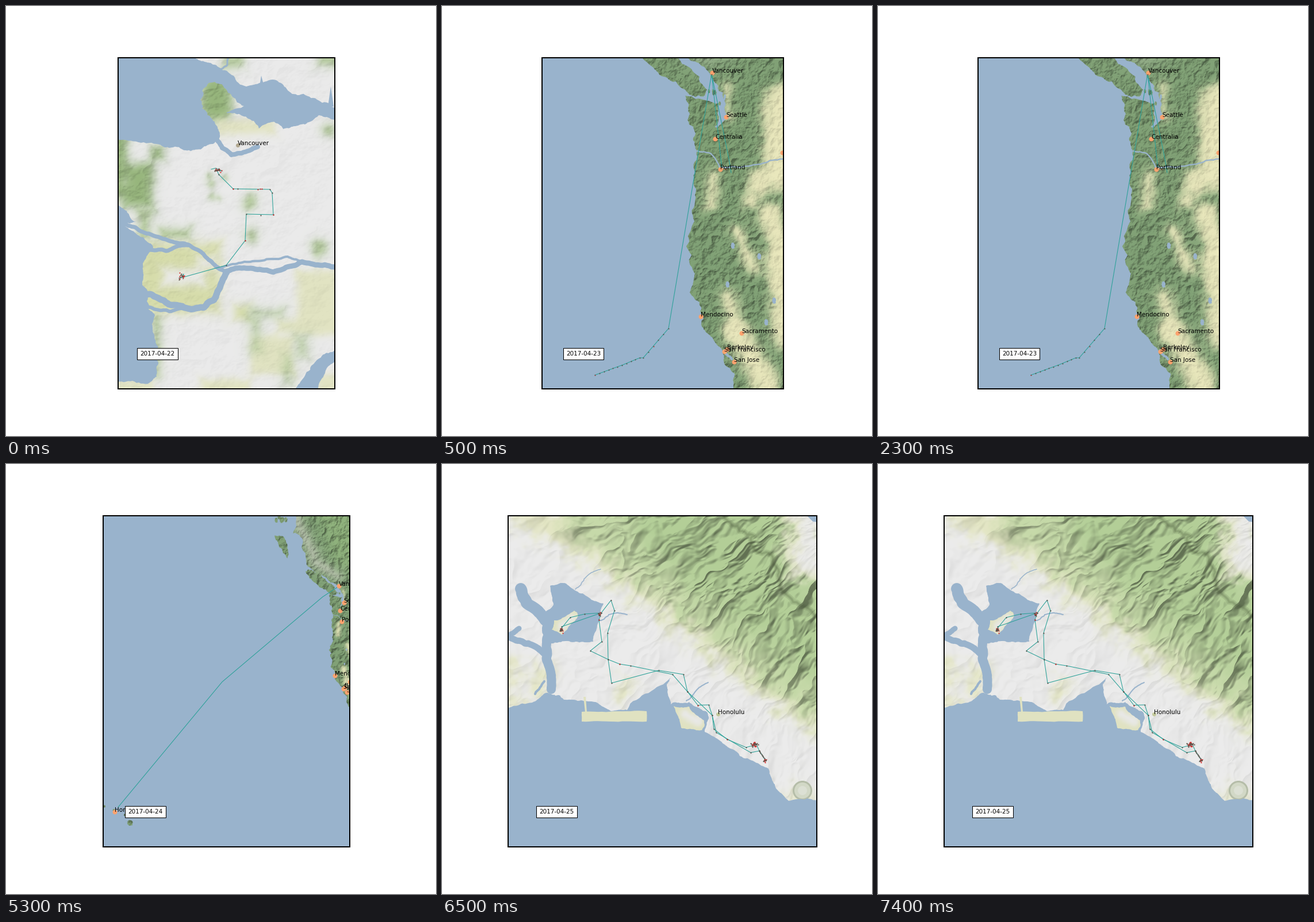
A matplotlib script that plays this animation: 748 by 748 pixels, repeating every 8000 ms.

```python
import numpy as np
import matplotlib.pyplot as plt
from matplotlib.animation import FuncAnimation
from matplotlib.patches import Polygon, Circle

SIZE = 748
DPI = 74.8
PT = 72 / DPI  # points per pixel
MID = 383.9

WATER = "#99b3cc"
TRACK = "#2aa198"
DARK = "#5a5148"
RED = "#d42a2a"
CITY = "#fca26e"

GREY = (233, 233, 233)
YELLOW = (212, 218, 168)
PALE = (224, 226, 193)
GREEN = (172, 194, 148)
LEAF = (146, 176, 120)
FOREST = (119, 149, 109)
DRY = (228, 226, 184)
SNOW = (196, 198, 186)

# longitude and latitude
CITIES = {
    "Vancouver": (-123.12, 49.25), "Seattle": (-122.33, 47.58),
    "Centralia": (-122.95, 46.72), "Portland": (-122.67, 45.52),
    "Mendocino": (-123.78, 39.36), "Sacramento": (-121.45, 38.61),
    "Berkeley": (-122.27, 37.90), "San Francisco": (-122.43, 37.80),
    "San Jose": (-121.88, 37.34), "Honolulu": (-157.86, 21.27)}
SHORE = [(-130.1, 57), (-130.2, 54.3), (-128.3, 52.5), (-127.6, 51.1),
         (-125.1, 50.1), (-123.5, 49.4), (-123.05, 49), (-122.5, 48.5),
         (-122.3, 47.5), (-122.9, 47.1), (-122.7, 48.1), (-124.65, 48.38),
         (-124.2, 47.2), (-124, 46.25), (-124.1, 44.5), (-124.5, 42.8),
         (-124.1, 41.2), (-124.4, 40.4), (-123.8, 39.6), (-123.75, 39),
         (-122.95, 38.2), (-122.5, 37.7), (-122.4, 37.2), (-121.85, 36.8),
         (-121.9, 36.4), (-120.6, 34.5)]
BIG_ISLE = [(-128.3, 50.7), (-127.3, 50.9), (-125, 49.75), (-123.4, 48.6),
            (-123.6, 48.35), (-124.8, 48.65), (-126.6, 49.5), (-128.3, 50.7)]
NORTH_ISLE = [(-133.1, 54.1), (-131.7, 54), (-131.1, 52), (-132.4, 53.1),
              (-133.1, 54.1)]

plt.rcParams["font.family"] = "DejaVu Sans"
fig = plt.figure(figsize=(SIZE / DPI, SIZE / DPI), dpi=DPI, facecolor="white")


def noise(u, v, seed, octaves=4):
    """Sum of smooth value noise, roughly 0..1."""
    rng = np.random.default_rng(seed)
    total, weight = 0, 0
    for k in range(octaves):
        lattice = rng.random((64, 64))
        a, b = u * 2**k, v * 2**k
        i, j = np.floor(a).astype(int), np.floor(b).astype(int)
        s, t = a - i, b - j
        s, t = s * s * (3 - 2 * s), t * t * (3 - 2 * t)

        def at(p, q):
            return lattice[(i + p) % 64, (j + q) % 64]

        top = at(0, 0) * (1 - s) + at(1, 0) * s
        low = at(0, 1) * (1 - s) + at(1, 1) * s
        total = total + (top * (1 - t) + low * t) / 2**k
        weight += 1 / 2**k
    return total / weight


def ridged(u, v, seed, octaves=4):
    return -abs(2 * noise(u, v, seed, octaves) - 1)


def rough(pts, amp=0.08, depth=4):
    """Roughen a line by displacing midpoints sideways."""
    rng = np.random.default_rng(len(pts))
    pts = np.array(pts, float)
    for _ in range(depth):
        a, b = pts[:-1], pts[1:]
        side = np.stack([a[:, 1] - b[:, 1], b[:, 0] - a[:, 0]], 1)
        size = np.hypot(*side.T)[:, None]
        side *= np.minimum(1, 25 / np.maximum(size, 1e-6))
        out = np.empty((2 * len(pts) - 1, 2))
        out[::2] = pts
        out[1::2] = (a + b) / 2 + side * rng.normal(0, amp, (len(a), 1))
        pts = out
    return pts


def oval(x, y, w, h):
    a = np.linspace(0, 2 * np.pi, 13)
    return rough(np.stack([x + w * np.cos(a), y + h * np.sin(a)], 1), 0.12, 2)


def along(pts, n):
    """n points spread evenly along a path."""
    x, y = np.array(pts, float).T
    d = np.r_[0, np.cumsum(np.hypot(np.diff(x), np.diff(y)))]
    s = np.linspace(0, d[-1], n)
    return np.stack([np.interp(s, d, x), np.interp(s, d, y)], 1)


class Terrain:
    def __init__(self, ax, base, ragged, seed):
        (x0, x1), (y1, y0) = ax.get_xlim(), ax.get_ylim()
        xs = np.linspace(x0, x1, round(x1 - x0))
        ys = np.linspace(y0, y1, round(y1 - y0))
        self.x, self.y = np.meshgrid(xs, ys)
        self.img = np.ones(self.x.shape + (3,)) * base
        self.edge = ragged * (noise(self.x / 18, self.y / 18, seed, 3) - 0.5)

    def paint(self, color, soft, *shapes, alpha=1.0):
        """Soft boxes (x0, y0, x1, y1) or capsules (x0, y0, x1, y1, r)."""
        x, y = self.x, self.y
        for x0, y0, x1, y1, *r in shapes:
            if r:
                dx, dy = x1 - x0, y1 - y0
                t = ((x - x0) * dx + (y - y0) * dy) / max(dx * dx + dy * dy, 1)
                t = np.clip(t, 0, 1)
                d = np.hypot(x - x0 - t * dx, y - y0 - t * dy) - r[0]
            else:
                d = np.maximum(abs(x - (x0 + x1) / 2) - (x1 - x0) / 2,
                               abs(y - (y0 + y1) / 2) - (y1 - y0) / 2)
            d = np.clip((d + self.edge) / soft, -30, 30)
            a = alpha / (1 + np.exp(d))[..., None]
            self.img = self.img * (1 - a) + np.array(color) * a

    def shade(self, height, gain, floor):
        """Darken the slopes that face south-east, most of all on the green."""
        gy, gx = np.gradient(height)
        s = gx + gy
        s = np.clip(s / s.std(), -2.4, 0.6)
        wood = np.clip((self.img[..., 1] - self.img[..., 0]) / 26, 0, 1)
        light = 1 + gain * s * (floor + (1 - floor) * wood)
        return np.clip(self.img * light[..., None], 0, 245) / 255


def scene(half, date):
    ax = fig.add_axes([(MID - half) / SIZE, 0.11, 2 * half / SIZE, 0.77],
                      facecolor=WATER)
    ax.set(xlim=(MID - half, MID + half), ylim=(0.89 * SIZE, 0.12 * SIZE),
           xticks=[], yticks=[])
    ax.set_autoscale_on(False)
    for spine in ax.spines.values():
        spine.set(linewidth=2 * PT, zorder=6)
    ax.text(0.1, 0.1, date, fontsize=10, transform=ax.transAxes, zorder=7,
            bbox=dict(facecolor="white", pad=5))
    return ax


def land(ax, img, pts=None):
    im = ax.imshow(img, extent=(*ax.get_xlim(), *ax.get_ylim()),
                   aspect="auto", interpolation="bilinear", zorder=1)
    if pts is not None:
        im.set_clip_path(Polygon(pts, transform=ax.transData))


def water(ax, pts):
    ax.add_patch(Polygon(pts, facecolor=WATER, edgecolor="none", zorder=1))


def river(ax, width, *pts):
    ax.plot(*rough(pts, 0.05).T, color=WATER, lw=width * PT, zorder=1,
            solid_capstyle="round", solid_joinstyle="round")


def track(ax, *pts):
    ax.plot(*np.array(pts).T, color=TRACK, lw=1.05 * PT, zorder=2)


def dots(ax, color, pts, size=2.2):
    ax.plot(*np.array(pts).T, "o", color=color, ms=size * PT, mew=0, zorder=3)


def swarm(ax, x, y, spread, n):
    pts = np.random.default_rng(n).normal((x, y), spread, (n, 2))
    dots(ax, RED, pts[::2])
    dots(ax, DARK, pts[1::2])


def city(ax, x, y, name="", color=CITY, size=8):
    ax.plot([x], [y], "o", color=color, ms=size * PT, mew=0, zorder=3)
    ax.text(x, y, name, fontsize=10, zorder=4, clip_on=True)


def city_day():
    ax = scene(188.45, "2017-04-22")
    t = Terrain(ax, GREY, 9, seed=4)
    t.paint(LEAF, 5, (185, 225, 212, 330), (205, 275, 255, 350),
            (255, 245, 272, 264), (365, 150, 365, 175, 28))
    t.paint(GREEN, 5, (232, 355, 250, 405), (268, 387, 320, 405),
            (545, 418, 545, 422, 11), (425, 338, 425, 344, 9),
            (427, 398, 427, 400, 8), (262, 545, 262, 640, 6),
            (382, 85, 412, 104), (545, 84, 580, 102), (562, 214, 562, 216, 8))
    for x, y in np.random.default_rng(2).uniform((345, 292), (390, 350), (5, 2)):
        t.paint(GREEN, 3, (x, y, x, y, 4), alpha=0.7)
    t.paint(YELLOW, 5, (228, 412, 372, 534), (400, 522, 421, 543))
    t.paint(GREY, 5, (274, 458, 344, 484), (335, 438, 362, 456))
    t.paint(PALE, 4, (506, 460, 580, 568), (474, 545, 580, 568),
            (340, 650, 424, 675), (428, 575, 500, 640), (368, 198, 468, 222),
            (190, 650, 255, 675), (540, 640, 580, 675))
    t.paint(GREEN, 6, (428, 528, 482, 540), (428, 545, 442, 600),
            (506, 575, 524, 610), (485, 610, 495, 655), alpha=0.75)
    img = t.shade(ridged(t.x / 55, t.y / 42, 5, 5), 0.05, 0.2)
    land(ax, img)

    bay = [(318, 90), (340, 96), (371, 107), (418, 140), (470, 129), (510, 155),
           (564, 172), (580, 180), (580, 198), (545, 190), (520, 206),
           (482, 214), (470, 204), (440, 213), (426, 198), (387, 186),
           (362, 197), (371, 230), (345, 244), (313, 251), (262, 240),
           (190, 232)]
    water(ax, np.vstack([rough(bay), (190, 80), (318, 80)]))
    water(ax, [(441, 140), (444, 121), (449, 140)])
    water(ax, [(560, 175), (565, 140), (570, 175)])
    land(ax, img, oval(363, 163, 25, 31))
    land(ax, img, rough([(372, 140), (414, 174), (380, 186), (385, 196),
                         (360, 200), (350, 180), (372, 140)]))
    river(ax, 8, (364, 228), (376, 247), (392, 259), (415, 254), (438, 245))
    sea = [(190, 342), (226, 375), (204, 379), (232, 400), (256, 420),
           (243, 440), (237, 485), (247, 500), (247, 526), (259, 538),
           (257, 570), (266, 600), (262, 645), (250, 655), (190, 650)]
    water(ax, rough(sea))
    water(ax, rough([(580, 596), (550, 608), (531, 626), (501, 670), (540, 670),
                     (556, 634), (580, 614)]))
    river(ax, 7, (195, 373), (225, 385), (290, 410), (335, 425), (365, 453),
          (382, 462))
    river(ax, 7, (232, 421), (285, 424), (318, 416))
    river(ax, 11, (240, 500), (265, 508), (283, 519), (320, 527), (345, 524),
          (362, 511), (372, 490), (384, 463))
    river(ax, 6, (247, 524), (290, 530), (320, 528))
    river(ax, 9, (382, 462), (402, 456), (465, 463), (515, 445), (578, 456))
    river(ax, 4, (352, 443), (372, 456), (425, 445), (490, 436), (512, 444))
    river(ax, 3, (366, 112), (385, 102), (390, 85))

    path = [(367, 286), (370, 293), (395, 318), (459, 319), (463, 325),
            (465, 363), (418, 362), (416, 408), (383, 451), (304, 473)]
    track(ax, (357, 284), (365, 282), (376, 287), *path, (309, 466), (308, 475))
    dots(ax, DARK, path[1:-1] + [(403, 318), (443, 364)])
    dots(ax, RED, path[2::5] + [(438, 319), (442, 318), (445, 318), (465, 363)])
    swarm(ax, 367, 285, (4, 1.5), 18)
    swarm(ax, 306, 470, (2, 2.8), 17)
    city(ax, 403, 241.8, "Vancouver", "#b0a78f", 7)
    return ax


def mercator(x, y, scale):
    """Projection to pixels that puts Vancouver at x, y."""
    def fwd(pts):
        lon, lat = np.array(pts, float).T
        up = np.degrees(np.log(np.tan(np.pi / 4 + np.radians(lat) / 2)))
        return np.stack([x + (lon + 123.12) * scale,
                         y + (56.75 - up) * scale], 1)
    return fwd


def pacific(ax, to_px, scale, relief):
    """The west coast with its cities, at any scale."""
    t = Terrain(ax, FOREST, 0.5 * scale, seed=8)

    def belt(color, soft, *shapes, alpha=1.0):
        for *ends, r in shapes:
            (x0, y0), (x1, y1) = to_px(np.reshape(ends, (2, 2)))
            t.paint(color, soft * scale, (x0, y0, x1, y1, r * scale), alpha=alpha)

    belt(DRY, 0.16, (-118.9, 48, -119, 45.6, 1.3), (-120.7, 45.2, -120.9, 44.3, 0.4),
         (-119.2, 45.3, -120.4, 44.9, 0.4), (-119.8, 43.7, -119, 42.2, 0.7),
         (-119, 41.7, -118.8, 38.6, 0.95), (-121.7, 43, -120.8, 41.5, 0.3),
         (-123.05, 45.3, -123.2, 44.1, 0.27), (-122.25, 40.2, -121.8, 39, 0.4),
         (-121.7, 38.6, -120, 36.3, 0.72), (-122.3, 48.8, -122.2, 47.6, 0.12))
    belt((134, 166, 116), 0.6, (-123.5, 56, -121.5, 52.5, 2.4))
    belt(SNOW, 0.4, (-130, 56, -127, 52.3, 0.7), (-126.5, 51.6, -123.3, 50.3, 0.6),
         alpha=0.75)
    img = t.shade(ridged(t.x / relief, t.y / relief, 9, 4), 0.14, 0.3)

    border = to_px([(-110, 34.5), (-110, 57)])
    land(ax, img, np.vstack([rough(to_px(SHORE), 0.1), border]))
    for isle in (BIG_ISLE, NORTH_ISLE):
        land(ax, img, rough(to_px(isle), 0.1))
    rng = np.random.default_rng(3)
    for k in range(14):  # islets in the strait and along the north
        spot = (-123, 48.6) if k < 7 else (-132.3, 55.6)
        x, y = to_px([rng.normal(spot, (0.15, 0.2) if k < 7 else (0.5, 0.3))])[0]
        r = (0.07 if k < 7 else 0.25) * scale
        land(ax, img, oval(x, y, r, 1.6 * r))
    for lon, lat, r in ((-155.5, 19.65, 0.45), (-156.3, 20.8, 0.18),
                        (-158, 21.5, 0.2), (-159.5, 22.05, 0.2)):
        land(ax, img, oval(*to_px([(lon, lat)])[0], r * scale, r * scale))

    w = scale / 30
    river(ax, 2.2 * w, *to_px([(-124, 46.25), (-123.2, 46.15), (-122.7, 45.6),
                               (-121.2, 45.65), (-119, 45.95)]))
    river(ax, 4 * w, *to_px([(-122.45, 37.85), (-122.2, 37.6), (-122, 37.45)]))
    river(ax, 3 * w, *to_px([(-122.4, 48.4), (-122.45, 47.6), (-122.9, 47.2)]))
    for lon, lat in ((-121.95, 42.4), (-120.45, 41.95), (-122.25, 40.75),
                     (-119.6, 40.05), (-120.05, 39.1)):
        water(ax, oval(*to_px([(lon, lat)])[0], 3.5 * w, 5.5 * w))
    for name, spot in CITIES.items():
        city(ax, *to_px([spot])[0], name)
    city(ax, *to_px([(-119.14, 46.2)])[0])


def coast_day():
    ax = scene(210, "2017-04-23")
    pacific(ax, mercator(470, 115.8, 30.58), 30.58, 17)
    trip = [(394, 561), (350, 612), (344, 612), (315, 624), (266, 642)]
    track(ax, (487, 283), (469, 118), (499, 266), (503, 290))
    track(ax, (469, 118), *trip)
    dots(ax, DARK, [(469, 119), *along(trip[:2], 6), *along(trip[2:], 11)], 2)
    dots(ax, RED, [(368, 592), (266, 642), (489, 283), (493, 284)], 1.5)
    return ax


def ocean_day():
    ax = scene(214.5, "2017-04-24")
    pacific(ax, mercator(579, 212.5, 11.22), 11.22, 13)
    track(ax, (580, 212), (551, 231), (376, 379), (195, 597))
    return ax


def island_day():
    ax = scene(268.5, "2017-04-25")
    t = Terrain(ax, GREY, 50, seed=15)
    t.paint(PALE, 8, (330, 40, 720, 335, 153), (150, 92, 225, 118, 22),
            (115, 350, 118, 410, 12), (172, 365, 172, 395, 9),
            (318, 385, 318, 400, 6), (590, 578, 640, 582, 6))
    t.paint((184, 202, 157), 8, (340, 30, 730, 330, 142))
    t.paint((163, 188, 138), 12, (430, 70, 740, 315, 108))
    t.paint(PALE, 6, (600, 70, 670, 200))
    t.paint(GREY, 8, (618, 70, 670, 185))
    # spurs fan out from a point beyond the north-east corner
    r = np.hypot(t.x - 930, t.y + 120)
    fan = np.arctan2(t.y + 120, 930 - t.x) * 640
    warp = 40 * noise(t.x / 50, t.y / 50, 16, 3)
    height = ridged((r + warp) / 85, (fan + warp) / 42, 17, 4)
    img = t.shade(height, 0.17, 0.12)
    land(ax, img)

    ridge = rough([(490, 85), (543, 125), (545, 150), (582, 180), (588, 215),
                   (660, 268)], 0.15)
    for w in (9, 5, 2.5):
        ax.plot(*ridge.T, color="#4c5a3c", lw=w, alpha=0.14, zorder=1)
    for size, color in ((17, "#b5bda8"), (14, "#d2d8c6"), (8, "#dce0d4")):
        ax.add_patch(Circle((627, 568), size, color=color, zorder=1, lw=0))

    coast = [(110, 426), (150, 416), (184, 398), (203, 402), (212, 410),
             (260, 413), (294, 430), (322, 428), (398, 371), (391, 384),
             (398, 418), (430, 414), (462, 433), (457, 466), (490, 487),
             (518, 508), (568, 530), (580, 562), (603, 586), (660, 582)]
    water(ax, np.vstack([rough(coast, 0.06), (660, 680), (110, 680)]))
    water(ax, [(630, 85), (660, 85), (660, 102), (645, 100)])
    basin = [(188, 212), (213, 207), (255, 232), (281, 243), (268, 290),
             (263, 309), (215, 308), (185, 312), (174, 290), (180, 258),
             (194, 245), (188, 212)]
    water(ax, rough(basin, 0.06))
    river(ax, 20, (137, 217), (150, 244), (180, 272))
    river(ax, 16, (184, 290), (184, 345), (190, 392))
    river(ax, 11, (110, 297), (150, 312), (182, 335))
    river(ax, 9, (118, 298), (134, 286))
    river(ax, 4, (162, 400), (178, 378))

    shore = Terrain(ax, PALE, 10, seed=21)
    shore.paint(GREY, 3, (210, 282, 224, 268, 7), (425, 435, 442, 446, 8))
    flat = shore.img / 255
    land(ax, flat, rough([(243, 431), (356, 430), (356, 448), (243, 448),
                          (243, 431)], 0.02))
    land(ax, flat, [(246, 405), (250, 405), (252, 432), (249, 432)])
    land(ax, flat, rough([(191, 288), (195, 272), (230, 255), (237, 264),
                          (208, 297), (191, 288)], 0.06))
    land(ax, flat, rough([(403, 421), (430, 422), (456, 446), (452, 463),
                          (416, 459), (403, 421)], 0.06))
    river(ax, 1.5, (232, 218), (247, 200), (276, 183))
    river(ax, 2, (271, 274), (290, 262), (322, 262))
    river(ax, 2, (425, 412), (436, 402), (463, 380))

    out = [(206, 288), (223, 267), (248, 261), (277, 259), (273, 271),
           (278, 309), (258, 325), (289, 340), (309, 348), (328, 351),
           (401, 366), (427, 396), (445, 419.5), (464, 419), (470, 437),
           (473, 461), (496, 479), (529, 493), (547, 488), (552, 499)]
    back = [(552, 499), (537, 502), (477, 467), (470, 437), (427, 396),
            (420, 366), (377, 359), (295, 381), (289, 340), (288, 294),
            (300, 255), (294, 237), (277, 259), (208, 283)]
    beach = [(552, 499), (563, 516)]
    for path in (out, back, beach):
        track(ax, *path)
    dots(ax, DARK, out + back)
    dots(ax, RED, out[4::4])
    dots(ax, DARK, along(beach, 10))
    swarm(ax, 207, 288, (1.7, 2.2), 18)
    swarm(ax, 274, 262, (1.7, 2.2), 10)
    swarm(ax, 543, 488, (2.8, 2), 28)
    swarm(ax, 562, 515, (1.4, 1.6), 9)
    city(ax, 480, 435, "Honolulu", "#c3c99c", 7)
    return ax


STEP = 500
FRAMES = 16
scenes = [city_day(), coast_day(), ocean_day(), island_day()]
starts = [0, 500, 3500, 6500]


def update(frame):
    now = sum(frame * STEP >= s for s in starts) - 1
    for k, ax in enumerate(scenes):
        ax.set_visible(k == now)
    return scenes


anim = FuncAnimation(fig, update, frames=FRAMES, interval=STEP, repeat=True,
                     repeat_delay=0, blit=False)
plt.show()
```
